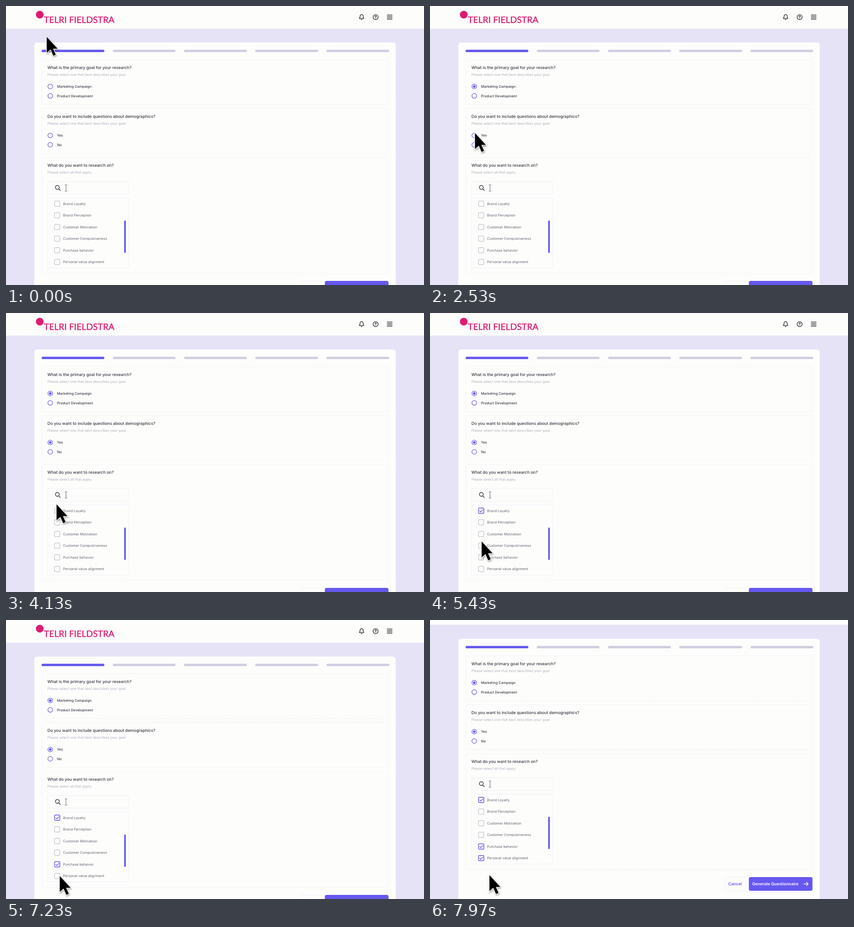
An HTML page for the animation above (8000 ms loop, 916 by 611 pixels).

```html
<!DOCTYPE html>
<html lang="en">
<head>
<meta charset="utf-8">
<title>Research questionnaire</title>
<style>
  html, body { margin: 0; width: 100%; height: 100%; overflow: hidden; background: #e6e3f6; }
  svg { display: block; width: 916px; height: 611px; font-family: Inter, sans-serif; text-rendering: geometricPrecision; }

  .title { font-size: 8.94px; font-weight: 500; fill: #37353d; }
  .hint { font-size: 7.68px; fill: #b2b0bb; }
  .choice { font-size: 7.64px; font-weight: 500; fill: #3d3b43; }
  .item { font-size: 7.64px; fill: #67656e; }
  .button { font-size: 8.86px; font-weight: 600; }
  .brand { font: 19.4px Lato, sans-serif; fill: #dc1c70; stroke: #dc1c70; stroke-width: .4; }
  .panel { fill: none; stroke: #f1eff9; }
  .ring { fill: #fdfdfc; stroke: #6658ee; stroke-width: 1.25; }
  .box { fill: #fdfdfc; stroke: #c3bfcd; stroke-width: 1.2; }
  .tick { fill: none; stroke: #6658ee; stroke-width: 1.4; }
  .icon { fill: none; stroke: #24232a; stroke-width: 1.3; stroke-linecap: round; stroke-linejoin: round; }

  #page { animation: scroll 8s infinite; }
  #cursor { animation: travel 8s cubic-bezier(.37, 0, .63, 1) infinite; filter: drop-shadow(1.5px 2px 1.5px rgba(0, 0, 0, .35)); }
  .pick { animation: 8s step-end infinite; }
  #goal { animation-name: pickGoal; }
  #yes { animation-name: pickYes; }
  #loyalty { animation-name: pickLoyalty; }
  #purchase { animation-name: pickPurchase; }
  #value { animation-name: pickValue; }

  @keyframes scroll {
    0%, 94.5% { transform: none; animation-timing-function: cubic-bezier(.37, 0, .63, 1); }
    99%, 100% { transform: translateY(-39px); }
  }
  @keyframes travel {
    0% { transform: translate(89.2px, 67.5px); }
    16.2%, 21.2% { transform: translate(102.7px, 176.5px); }
    33.75%, 40.6% { transform: translate(98.2px, 285.5px); }
    54.6%, 60.6% { transform: translate(112.2px, 434.5px); }
    72.9%, 78.1% { transform: translate(113.7px, 536.5px); }
    88.75% { transform: translate(117.7px, 560.5px); }
    97% { transform: translate(117.7px, 560.5px); animation-timing-function: ease-in; }
    99.7%, 100% { transform: translate(130.7px, 558.5px); }
  }
  @keyframes pickGoal { 0% { opacity: 0 } 18.3% { opacity: 1 } }
  @keyframes pickYes { 0% { opacity: 0 } 36% { opacity: 1 } }
  @keyframes pickLoyalty { 0% { opacity: 0 } 57% { opacity: 1 } }
  @keyframes pickPurchase { 0% { opacity: 0 } 75% { opacity: 1 } }
  @keyframes pickValue { 0% { opacity: 0 } 92% { opacity: 1 } }
</style>
</head>
<body>
<svg viewBox="0 0 916 611">
  <rect width="916" height="611" fill="#e6e3f6"/>
  <g id="page">
    <rect y="-1" width="916" height="50.5" fill="#fdfdfc"/>
    <circle cx="74" cy="19" r="8.5" fill="#dc1c70"/>
    <text class="brand" x="83" y="37.3">TELRI FIELDSTRA</text>

    <g class="icon">
      <path d="M774.3 27.3C776 25.5 775.7 24 775.9 22.3C776.4 17.8 782.2 17.8 782.7 22.3C782.9 24 782.6 25.5 784.3 27.3ZM777.9 29.4Q779.3 31 780.7 29.4M779.3 18.8V18.3"/>
      <circle cx="810" cy="24.3" r="5.5"/>
      <path d="M808.4 23C808.5 20.7 811.9 21 811.7 23C811.6 24.2 810 24.2 810 25.3M810 27.2V27.3"/>
      <path d="M835.5 20H846M835.5 24.2H846M835.5 28.4H846" stroke-width="1.7"/>
    </g>

    <rect x="62" y="80" width="792" height="620" rx="6" fill="#fdfdfc"/>
    <g id="form"></g>

    <rect class="panel" x="91" y="384.5" width="178.5" height="27.5" rx="3"/>
    <g class="icon">
      <circle cx="112.5" cy="397.3" r="4.2"/>
      <path d="M115.6 400.5L119 404"/>
    </g>
    <path d="M129 391.3Q131.5 391.3 131.5 393V404Q131.5 405.8 129 405.8M134 391.3Q131.5 391.3 131.5 393M134 405.8Q131.5 405.8 131.5 404" fill="none" stroke="#65636b"/>
    <rect class="panel" x="91" y="420.5" width="178.5" height="153" rx="3"/>
    <g id="list"></g>
    <rect x="259" y="470" width="3.6" height="70.5" rx="1.2" fill="#6658ee"/>

    <rect class="panel" x="646" y="602" width="46.5" height="30" rx="4"/>
    <text class="button" x="653.5" y="620.3" fill="#6658ee">Cancel</text>
    <rect x="698.7" y="602" width="139.5" height="30" rx="4" fill="#6658ee"/>
    <text class="button" x="706" y="620.3" fill="#fff">Generate Questionnaire</text>
    <path d="M818.5 617H828.5M824.5 612.8L828.7 617L824.5 621.2" fill="none" stroke="#fff" stroke-width="1.4"/>
  </g>

  <g id="cursor">
    <path d="M0 0V35L8.4 27.8L14.4 41.4L20 39L14 26H24Z" fill="#000" stroke="#fff" stroke-width="3" paint-order="stroke" stroke-linejoin="round"/>
  </g>
</svg>

<script>
  const label = (kind, x, y, text) => `<text class="${kind}" x="${x}" y="${y}">${text}</text>`;

  const steps = [0, 1, 2, 3, 4].map(i =>
    `<rect x="${78 + i * 156.1}" y="95.8" width="137.5" height="5.2" rx="2.6" fill="${i ? '#d2cde0' : '#6658ee'}"/>`);

  const panel = (y, height, title, hint) =>
    `<rect class="panel" x="78.5" y="${y}" width="759.5" height="${height}" rx="4" stroke-dasharray="3 1"/>` +
    label('title', 90.7, y + 20.4, title) + label('hint', 90.7, y + 35.4, hint);

  const radio = (y, text, id) =>
    `<circle class="ring" cx="97" cy="${y}" r="5.2"/>` +
    (id ? `<circle id="${id}" class="pick" cx="97" cy="${y}" r="2.8" fill="#6658ee"/>` : '') +
    label('choice', 111.7, y + 2.8, text);

  const square = (y, kind) =>
    `<rect class="${kind}" x="106.4" y="${y - 5.8}" width="11.6" height="11.6" rx="1.6"/>`;

  const checkbox = ([text, id], i) => {
    const y = 433 + i * 25.5;
    const checked = id
      ? `<g id="${id}" class="pick">${square(y, 'tick')}<path class="tick" d="M108.6 ${y}l2.6 2.8l5 -5.2"/></g>`
      : '';
    return square(y, 'box') + checked + label('item', 125, y + 2.8, text);
  };

  const single = 'Please select one that best describes your goal';
  document.getElementById('form').innerHTML = [
    ...steps,
    panel(117.5, 98, 'What is the primary goal for your research?', single),
    radio(176.2, 'Marketing Campaign', 'goal'),
    radio(196.8, 'Product Development'),
    panel(224.5, 98.5, 'Do you want to include questions about demographics?', single),
    radio(283.5, 'Yes', 'yes'),
    radio(304, 'No'),
    panel(331.8, 253.7, 'What do you want to research on?', 'Please select all that apply.')
  ].join('');

  document.getElementById('list').innerHTML = [
    ['Brand Loyalty', 'loyalty'],
    ['Brand Perception'],
    ['Customer Motivation'],
    ['Customer Compulsiveness'],
    ['Purchase behavior', 'purchase'],
    ['Personal value alignment', 'value']
  ].map(checkbox).join('');
</script>
</body>
</html>
```
